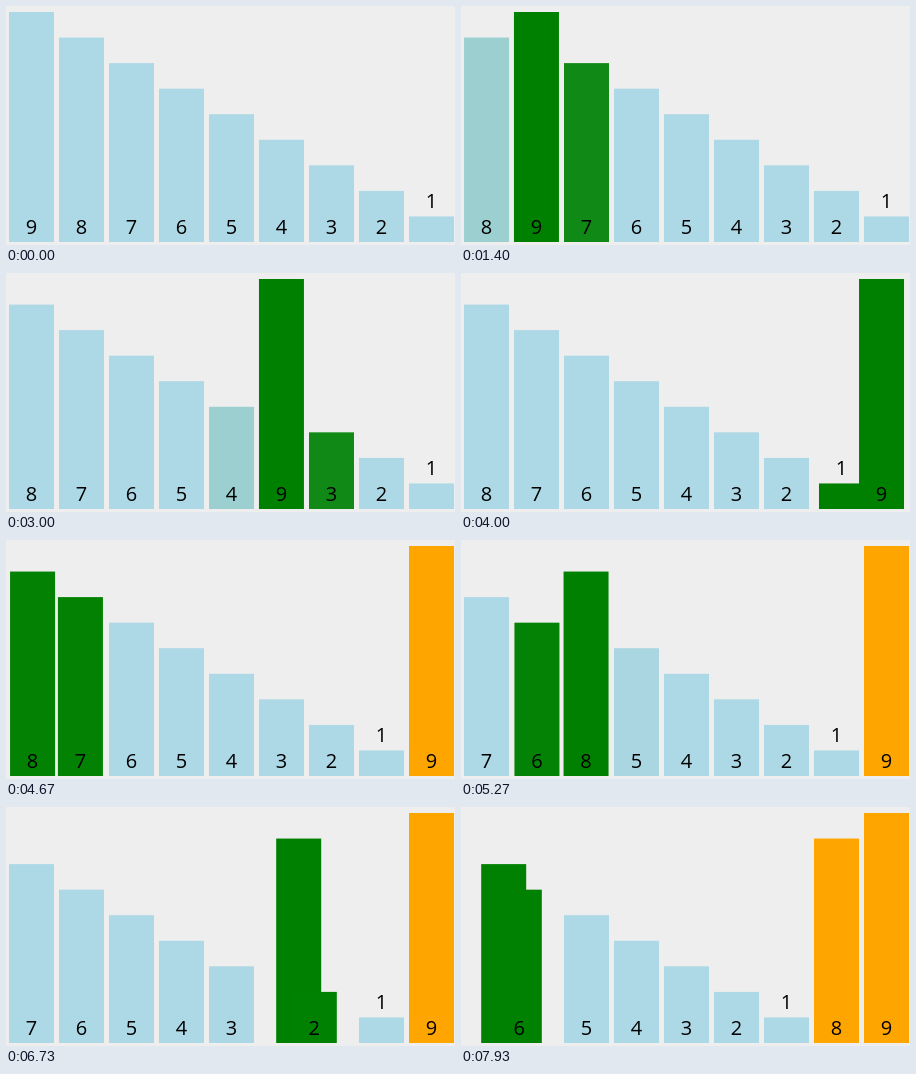
An HTML page with a canvas that plays this animation: 449 px wide and 239 px high, repeating every 8000 ms.

```html
<!DOCTYPE html>
<html lang="en">
<head>
<meta charset="utf-8">
<title>Bubble sort</title>
<style>
  html, body { margin: 0; width: 100%; height: 100%; overflow: hidden; background: #eee; }
  canvas { display: block; }
</style>
</head>
<body>
<canvas id="stage" width="449" height="239"></canvas>
<script>
const ctx = document.getElementById("stage").getContext("2d");

const LOOP = 8000, FRAME = 1000 / 15;
const START = 823, STEP = 200, DURATION = 250;
const LAG = 17; // a new transition takes over one screen refresh late
const COUNT = 9, PITCH = 50, LEFT = 3, BAR = 45, FLOOR = 236, UNIT = 230 / COUNT;
const BLUE = [173, 216, 230], GREEN = [0, 128, 0], ORANGE = [255, 165, 0];

// Each step holds one target per bar: [x, r, g, b].
const order = Array.from({ length: COUNT }, (_, i) => COUNT - i);
const steps = [];

function addStep(active, sorted) {
  const to = [];
  order.forEach((value, slot) => {
    const color = active.includes(slot) ? GREEN : slot >= sorted ? ORANGE : BLUE;
    to[COUNT - value] = [LEFT + PITCH * slot, ...color];
  });
  steps.push({ at: START + STEP * (steps.length - 1), to });
}

function buildSteps() {
  addStep([], COUNT);
  for (let end = COUNT; end > COUNT - 3; end--) {
    for (let j = 0; j < end - 1; j++) {
      addStep([j, j + 1], end);
      if (order[j] > order[j + 1]) {
        [order[j], order[j + 1]] = [order[j + 1], order[j]];
        addStep([j, j + 1], end);
      }
    }
    addStep([], end - 1);
    addStep([], end - 1);
  }
  steps[0].from = steps[0].to;
  for (let k = 1; k < steps.length; k++) {
    steps[k].from = pose(steps[k - 1], steps[k].at + LAG);
  }
}

function easeCubic(t) {
  if (t <= 0) return 0;
  if (t >= 1) return 1;
  return t < 0.5 ? 4 * t ** 3 : 1 - 4 * (1 - t) ** 3;
}

function pose(step, time) {
  const e = easeCubic((time - step.at) / DURATION);
  return step.to.map((target, i) =>
    target.map((v, c) => step.from[i][c] + (v - step.from[i][c]) * e));
}

function drawBar([x, r, g, b], value) {
  const top = FLOOR - UNIT * value;
  ctx.fillStyle = `rgb(${Math.round(r)}, ${Math.round(g)}, ${Math.round(b)})`;
  ctx.fillRect(x, top, BAR, FLOOR - top);
  ctx.fillStyle = "#000";
  ctx.fillText(value, x + BAR / 2, value === 1 ? 202 : 228);
}

function draw(time) {
  let k = steps.length - 1;
  while (k > 0 && steps[k].at + LAG > time) k--;
  ctx.fillStyle = "#eee";
  ctx.fillRect(0, 0, 449, 239);
  ctx.font = '20px "Open Sans", "Noto Sans", sans-serif';
  ctx.textAlign = "center";
  pose(steps[k], time).forEach((bar, i) => drawBar(bar, COUNT - i));
}

const origin = performance.now();

function tick() {
  const time = (performance.now() - origin) % LOOP;
  draw(Math.floor((time + 5) / FRAME) * FRAME % LOOP);
  requestAnimationFrame(tick);
}

buildSteps();
tick();
</script>
</body>
</html>
```
